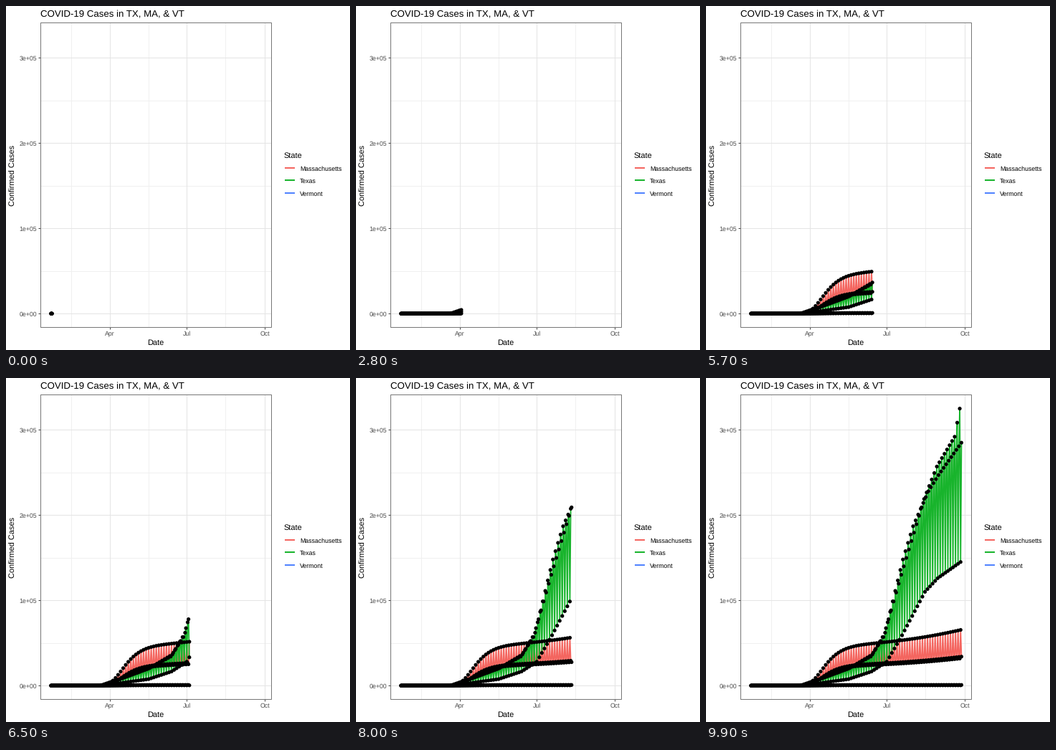
A matplotlib script that plays this animation: 480x480 px, repeating every 10000 ms.

```python
import numpy as np
import matplotlib
import matplotlib.pyplot as plt
from matplotlib.animation import FuncAnimation
from matplotlib.patches import Rectangle

matplotlib.rcParams.update({
    "font.family": "Liberation Sans",
    "text.hinting": "none",
})

SIZE, DPI = 480, 72
FRAMES, INTERVAL = 100, 100
LAST_DAY = 248
LEFT, RIGHT, TOP, BOTTOM = 48, 370, 23, 448
RED, GREEN, BLUE = "#f4655f", "#18b42c", "#4f82ff"
INK, AXIS_TEXT, TICK = "black", "#4d4d4d", "#444444"
DOT_AREA = 5.2 ** 2

days = np.arange(LAST_DAY + 1)


def px(day):
    return 62.9 + 1.1836 * day


def py(thousands):
    return 429.2 - 1.1893 * np.asarray(thousands, float)


def cycle(*curves):
    """Take the curves in turn, one per day."""
    return np.choose(days % 3, curves)


def path(*knots):
    return np.interp(days, *zip(*knots))


# Case counts in thousands: a Gompertz first wave, then slow growth.
wave = np.exp(-np.exp((83 - days) / 13.5))
bay = 48.5 * wave + 0.00078 * np.maximum(days - 100, 0) ** 2
massachusetts = cycle(0.487 * bay, bay, 0.518 * bay)
vermont = cycle(0.7 * wave, 0.3 * wave, 0.8 * wave)
texas = cycle(
    path((58, 0), (85, 9), (115, 20), (141, 34), (156, 57), (177, 130),
         (204, 219), (219, 257), (240, 292), (246, 325)),
    path((60, 0), (115, 7.6), (142, 16.5), (160, 28), (178, 59),
         (205, 110), (220, 126), (247, 145)),
    path((58, 0), (85, 9), (116, 20.5), (143, 36.5), (158, 62), (179, 148),
         (191, 187), (209, 228), (221, 247), (248, 285)),
)

fig = plt.figure(figsize=(SIZE / DPI, SIZE / DPI), dpi=DPI, facecolor="white")
ax = fig.add_axes([0, 0, 1, 1])
ax.set(xlim=(0, SIZE), ylim=(SIZE, 0))
ax.axis("off")


def label(x, y, text, size, color=INK, **kw):
    ax.text(x, y, text, fontsize=size, color=color, va="baseline", **kw)


def grid(xs, ys, color, width):
    ax.vlines(xs, TOP, BOTTOM, color=color, lw=width, zorder=1)
    ax.hlines(ys, LEFT, RIGHT, color=color, lw=width, zorder=1)


def stroke(xs, ys, color, width):
    ax.plot(xs, ys, color=color, lw=width, solid_capstyle="butt", zorder=4)


months = [(145, "Apr"), (252.4, "Jul"), (361, "Oct")]
levels = py([0, 100, 200, 300])
grid([91, 199, 306], py([50, 150, 250]), "#f0f0f0", 1)
grid([x for x, _ in months], levels, "#e5e5e5", 1.07)
ax.add_patch(Rectangle((LEFT, TOP), RIGHT - LEFT, BOTTOM - TOP, fill=False,
                       ec="#777777", lw=1, zorder=5))

for x, name in months:
    stroke([x, x], [BOTTOM, BOTTOM + 3], TICK, 1)
    label(x, 460.2, name, 8.8, AXIS_TEXT, ha="center")
for n, y in enumerate(levels):
    stroke([LEFT - 3, LEFT], [y, y], TICK, 1)
    label(43.2, y + 3.4, f"{n}e+{'05' if n else '00'}", 8.8, AXIS_TEXT,
          ha="right")

label(47.8, 15.2, "COVID-19 Cases in TX, MA, & VT", 13.2)
label(209, 473, "Date", 11, ha="center")
label(13.3, 236, "Confirmed Cases", 11, ha="center", rotation=90,
      rotation_mode="anchor")
label(387.3, 212.2, "State", 11)

states = [("Massachusetts", RED, massachusetts), ("Texas", GREEN, texas),
          ("Vermont", BLUE, vermont)]
tracks = []
for i, (name, color, cases) in enumerate(states):
    y = 226.2 + 17.28 * i
    stroke([389, 403], [y, y], color, 2)
    label(409.9, y + 3.7, name, 8.8)
    points = np.column_stack([px(days), py(cases)])
    line, = ax.plot([], [], color=color, lw=1.8, solid_joinstyle="round",
                    zorder=2 + 0.1 * i)
    # One size per dot keeps them at sub-pixel positions.
    dots = ax.scatter(*points.T, s=np.full(len(days), DOT_AREA), color=INK,
                      linewidths=0, zorder=3)
    tracks.append((line, dots, points))


def update(frame):
    count = min(LAST_DAY, frame * LAST_DAY // (FRAMES - 1) + 1) + 1
    for line, dots, points in tracks:
        line.set_data(*points[:count].T)
        dots.set_offsets(points[:count])
        dots.set_sizes(np.full(count, DOT_AREA))
    return [artist for track in tracks for artist in track[:2]]


anim = FuncAnimation(fig, update, frames=FRAMES, interval=INTERVAL,
                     repeat=True, repeat_delay=0)
plt.show()
```
